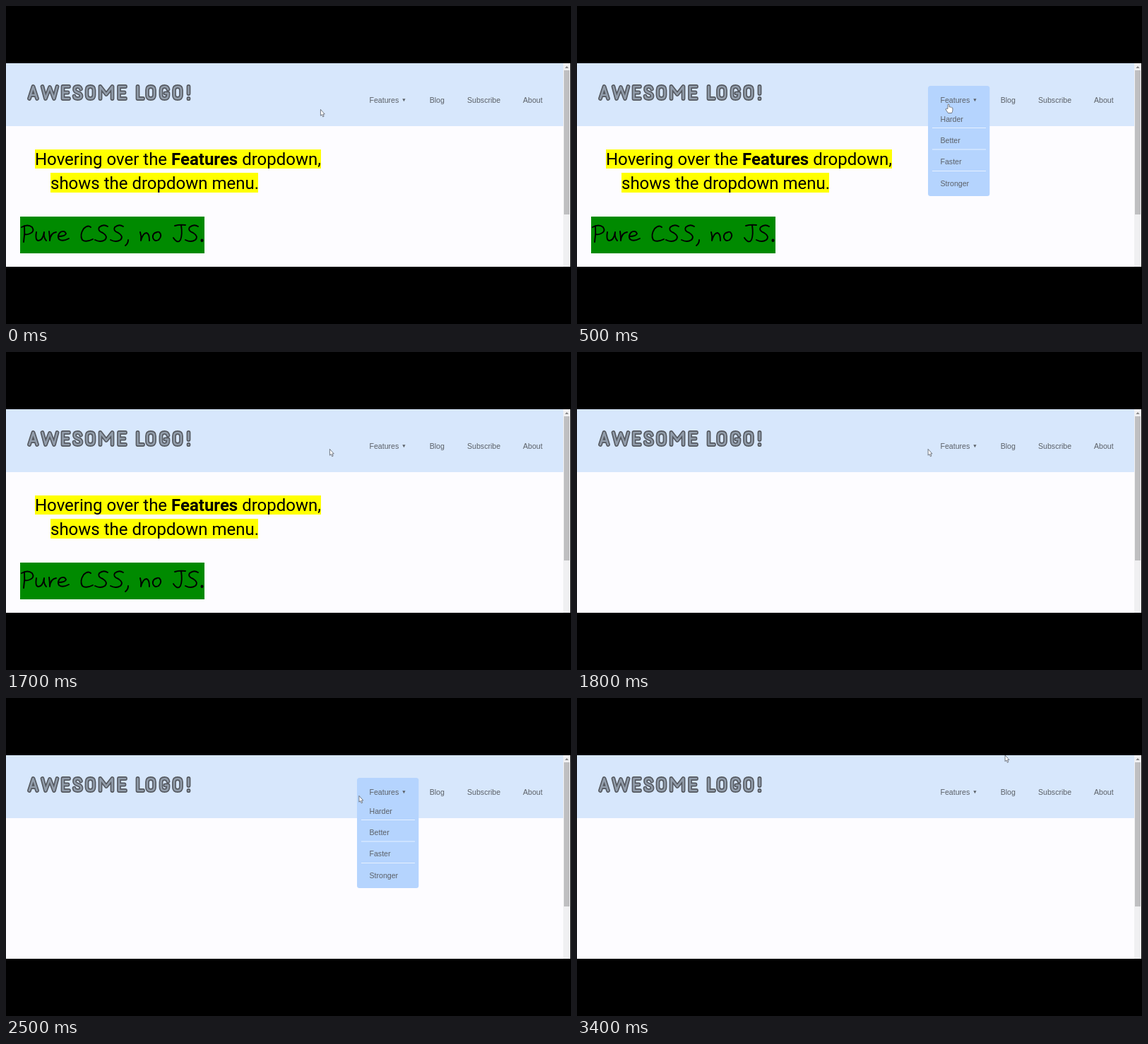
An HTML page for the animation above (3.5 s loop, 800 by 450 pixels).

```html
<!DOCTYPE html>
<html lang="en">
<head>
<meta charset="utf-8">
<title>Dropdown menu</title>
<style>
  html, body { margin: 0; width: 100%; height: 100%; overflow: hidden; background: #000; }
  svg { display: block; width: 800px; height: 450px; }
  .nav { font: 10.6px "Liberation Sans", Arial, sans-serif; fill: #5b6067; }
  .note { font: 24px Roboto, sans-serif; fill: #000; }
  .note .bold { font-weight: 700; }
  .line { fill: none; stroke-linecap: round; stroke-linejoin: round; }
</style>
</head>
<body>
<svg viewBox="0 0 800 450">
  <defs>
    <path id="logo" d="
      M33 131L38.5 114L44 131M35 126H42
      M51.5 114L56 131L62 115L68 131L72.5 114
      M89 114H80.5V131H89M80.5 122.5H87.5
      M106 117.5Q105 114 101.5 114Q97 114 97 118Q97 121 101.5 122.5Q106.5 124 106.5 127.5Q106.5 131 101.5 131Q97 131 96.5 127.5
      M114.5 119Q114.5 114 119.5 114T124.5 119V126Q124.5 131 119.5 131T114.5 126Z
      M133.5 131V114L142 125L150.5 114V131
      M169 114H160V131H169M160 122.5H167.5
      M186.5 114V131H194
      M200 119Q200 114 205 114T210 119V126Q210 131 205 131T200 126Z
      M229.5 118Q228.500 114 224.5 114Q219.5 114 219.5 119V126Q219.5 131 224.5 131Q229.500 131 229.500 126V123.500H225.500
      M238 119Q238 114 243 114T248 119V126Q248 131 243 131T238 126Z
      M258.500 114V124M258.500 131V131.200"/>
  </defs>

  <rect y="81" width="799" height="288" fill="#fdfcff"/>
  <rect y="81" width="789" height="89" fill="#d7e7fc"/>

  <g class="line" role="img" aria-label="AWESOME LOGO!">
    <use href="#logo" stroke="#54585f" stroke-width="5.800"/>
    <use href="#logo" stroke="#929dab" stroke-width="2.600"/>
  </g>

  <rect x="789" y="81" width="10" height="288" fill="#f0f0f2"/>
  <rect x="790" y="91" width="8" height="204" fill="#bfbfc1"/>
  <path d="M791.500 88H796.500L794 85Z" fill="#858587"/>

  <g id="menu" class="nav">
    <rect x="497" y="113" width="87.300" height="156" rx="3.500" fill="#b5d4fe"/>
    <path d="M503 172.500H579M503 203H579M503 233.500H579" stroke="#e6f0ff"/>
    <text x="514.500" y="163.500">Harder</text>
    <text x="514.500" y="194">Better</text>
    <text x="514.500" y="224.300">Faster</text>
    <text x="514.500" y="254.700">Stronger</text>
  </g>

  <g class="nav">
    <text x="514.500" y="137">Features</text>
    <path d="M561.300 131.300H565.500L563.400 135.300Z"/>
    <text x="599.700" y="137">Blog</text>
    <text x="653" y="137">Subscribe</text>
    <text x="732" y="137">About</text>
  </g>

  <g id="notes">
    <path d="M41 203H446V230H41ZM63 236H357V264H63Z" fill="#ff0"/>
    <text class="note" x="41" y="225">Hovering over the <tspan class="bold">Features</tspan> dropdown,</text>
    <text class="note" x="63" y="258.500">shows the dropdown menu.</text>
    <rect x="20" y="298" width="261" height="52" fill="#008a00"/>
    <g class="line" stroke="#000" stroke-width="1.900" role="img" aria-label="Pure CSS, no JS.">
      <path d="M26 311Q27 322 25 334M22 313Q31 308 37 313Q41 319 34 322Q30 324 26 323"/>
      <path d="M43 320Q41 332 46 332Q52 332 54 320Q53 328 57 332"/>
      <path d="M61 319Q62 326 62 332Q63 321 71 320"/>
      <path d="M74 326Q84 326 85 322Q83 317 77 320Q72 325 75 330Q80 334 89 329"/>
      <path d="M120 313Q116 309 110 315Q104 324 108 331Q113 335 123 330"/>
      <path d="M144 312Q138 308 132 313Q129 318 137 321Q145 326 140 331Q134 335 126 331"/>
      <path d="M166 312Q160 308 154 313Q151 318 159 321Q167 326 162 331Q156 335 148 331"/>
      <path d="M173 331Q173 336 169 339"/>
      <path d="M190 320Q192 326 191 332Q194 321 199 321Q203 322 203 332"/>
      <path d="M214 320Q207 321 208 328Q210 334 216 331Q222 325 217 320Q215 319 212 321"/>
      <path d="M239 311Q246 309 254 310M248 310Q250 324 247 331Q243 337 237 328"/>
      <path d="M272 312Q266 308 260 313Q257 318 265 321Q273 326 268 331Q262 335 254 331"/>
      <path d="M277.500 331.500V332" stroke-width="4"/>
    </g>
  </g>

  <g id="arrow" stroke="#555b66" stroke-width=".8" fill="#fff" stroke-linejoin="round">
    <path d="M.4 .4V9.200L2.300 7.500L3.700 10.800L5.200 10.100L3.800 7H6.300Z"/>
  </g>
  <g id="hand" stroke="#555b66" stroke-width=".8" fill="#fff" stroke-linejoin="round">
    <path d="M-1 7V1Q0 -.3 1 1V4.500Q2 3.700 2.800 4.800Q3.800 4.200 4.500 5.300Q5.800 5 5.900 6.300V9Q5.700 11 4.600 13H-.6Q-1.600 11 -3.600 8.500Q-4.200 6.600 -2.600 6.500Z"/>
  </g>
</svg>
<script>
const LOOP = 3500, STEP = 100, NOTES_END = 1800;

// time, x, y of the pointer tip
const path = [
  [0, 445, 146], [200, 462, 146], [400, 516, 140], [500, 526, 138.500],
  [1100, 534, 138.500], [1300, 512, 139], [1500, 456, 138], [1600, 448, 137],
  [1700, 458, 137], [1800, 496.700, 137], [1900, 499.500, 138], [2500, 499.500, 138],
  [2700, 530, 137], [3000, 596, 126], [3400, 605.700, 80.500]
];
const [menu, notes, arrow, hand] =
  ["menu", "notes", "arrow", "hand"].map(id => document.getElementById(id));

const show = (el, on) => el.setAttribute("visibility", on ? "visible" : "hidden");

function pointerAt(t) {
  const i = Math.max(1, path.findIndex(p => p[0] >= t));
  const [t0, x0, y0] = path[i - 1], [t1, x1, y1] = path[i];
  const k = (t - t0) / (t1 - t0);
  return [x0 + (x1 - x0) * k, y0 + (y1 - y0) * k];
}

function draw(now) {
  const t = Math.floor(now % LOOP / STEP) * STEP;
  const [x, y] = pointerAt(t);
  const open = x >= 498 && x <= 584 && y >= 113;
  const onLink = open && x > 508 && x < 574;
  show(menu, open);
  show(notes, t < NOTES_END);
  show(arrow, !onLink);
  show(hand, onLink);
  for (const el of [arrow, hand]) el.setAttribute("transform", `translate(${x} ${y})`);
}

const start = performance.now();
function tick() {
  draw(performance.now() - start);
  requestAnimationFrame(tick);
}
tick();
</script>
</body>
</html>
```
